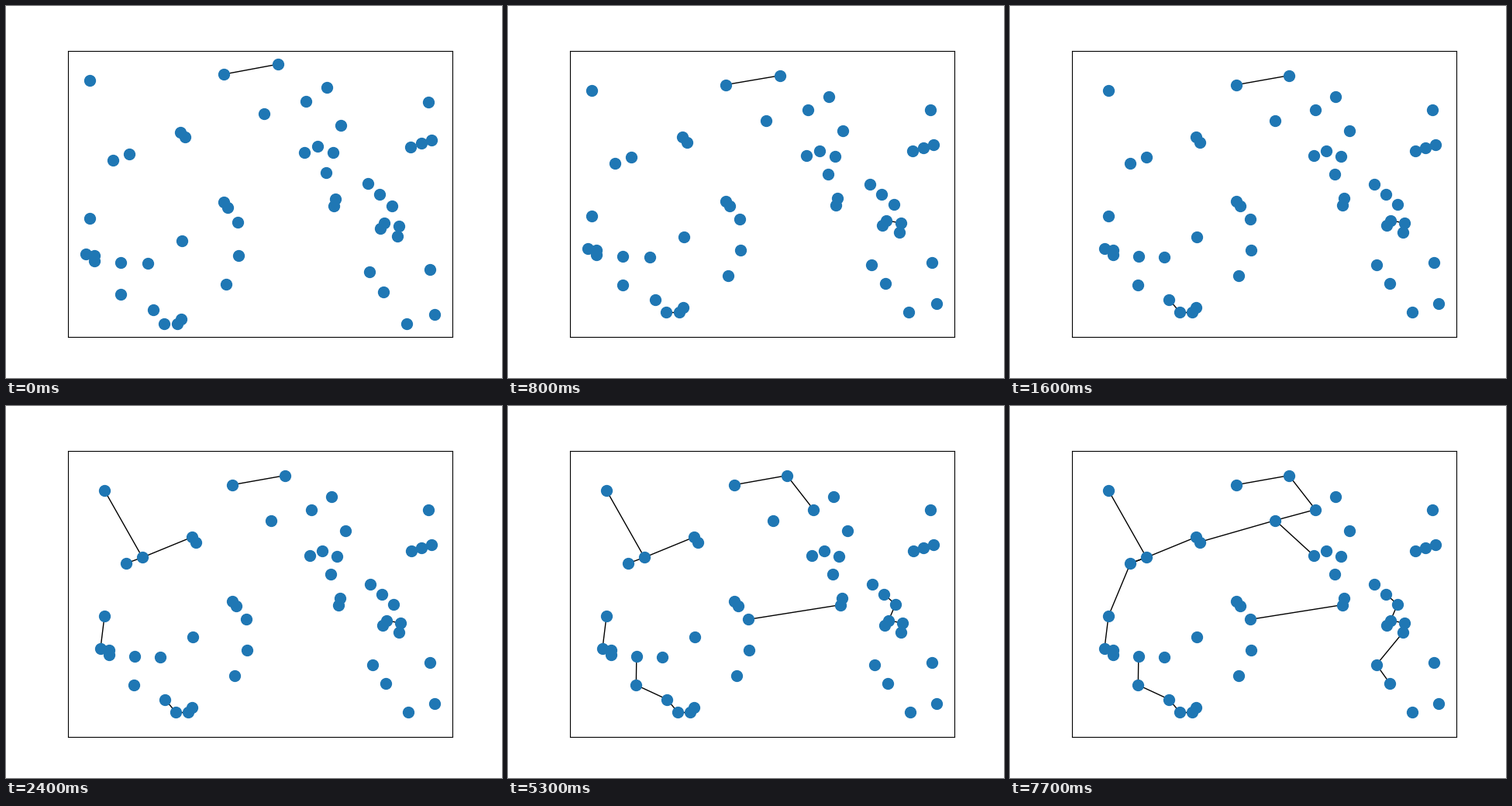
Animation of 640 by 480 pixels, one loop 8 s. Source, as a matplotlib script:

```python
import matplotlib.pyplot as plt
import numpy as np
from matplotlib.animation import FuncAnimation
from matplotlib.collections import LineCollection

FRAMES, INTERVAL = 80, 100
MARGIN = 0.05
VISIT_STEPS = 6      # steps between the visits of two hubs
PAUSE_STEPS = 2      # one longer wait after the third visit

# Key points, y pointing down. A row is three evenly spaced nodes.
ROWS = [
    ((292.2, 101.7), (392.4, 193.4)), ((408, 186.6), (430.6, 248.2)),
    ((470.4, 229.9), (500, 256)), ((523.4, 186.8), (549.3, 178.6)),
    ((132.7, 321.3), (199, 324.1)),
]
# A pair is two touching nodes around a centre, leaning right or left.
PAIRS = [((242, 172.5), 1), ((294.8, 255.2), 1),
         ((488.5, 279.8), -1), ((237.6, 392), -1)]
PAIR_HALF = np.array([2.5, 3.1])
SINGLES = [
    (127.1, 109), (359.9, 89.7), (420, 116.9), (394.1, 133.6), (437.6, 161.3),
    (545.2, 134.3), (427.4, 193.7), (428.8, 256.6), (509, 280.1), (507, 292.2),
    (472.8, 333.8), (547.2, 331.4), (490, 357.8), (553.4, 384.1), (518.8, 395),
    (176, 195.4), (155.4, 202.9), (127.1, 270.9), (121.9, 313), (132.9, 314.8),
    (241, 297.7), (310, 275.4), (310.9, 314.8), (295.4, 348.1), (165.3, 360),
    (205.4, 378.6), (219, 395.1),
]

# Hubs in order of visit, each with the nodes it joins, nearest first
VISITS = [
    (0, [24]), (31, [32, 19]), (49, [22, 48]), (41, [42, 40]), (38, [39, 15, 23]),
    (18, [17]), (47, [13, 48]), (24, [26]), (8, [7, 19]), (30, [5, 44]),
    (1, [26, 2, 16]), (21, [22]), (33, [35, 32]), (39, [38, 40]),
]


def build_nodes():
    rows = [np.linspace(start, end, 3) for start, end in ROWS]
    pairs = [centre + np.outer([-1, 1], PAIR_HALF * (lean, 1))
             for centre, lean in PAIRS]
    return np.vstack(rows + pairs + [SINGLES])


def build_edges():
    """One edge per step during each visit, as (step, hub, node)."""
    edges = []
    for k, (hub, joined) in enumerate(VISITS):
        start = VISIT_STEPS * k - 4 + PAUSE_STEPS * (k > 2)
        edges += [(start + i, hub, node) for i, node in enumerate(joined)]
    return edges


NODES, EDGES = build_nodes(), build_edges()

fig, ax = plt.subplots(figsize=(6.4, 4.8), dpi=100)
ax.set_xticks([])
ax.set_yticks([])
ax.scatter(*NODES.T, s=100, c="#1f77b4", linewidths=1, zorder=2)
lines = LineCollection([], colors="black", linewidths=1, zorder=1)
ax.add_collection(lines, autolim=False)


def view_limits(segments):
    """Fit the nodes and the padded box of the edges, plus a margin."""
    ends = segments.reshape(-1, 2)
    low, high = ends.min(axis=0), ends.max(axis=0)
    pad = MARGIN * (high - low)
    low = np.minimum(NODES.min(axis=0), low - pad)
    high = np.maximum(NODES.max(axis=0), high + pad)
    border = MARGIN * (high - low)
    return low - border, high + border


def draw(frame):
    segments = np.array([NODES[[a, b]] for step, a, b in EDGES if step <= frame])
    lines.set_segments(segments)
    (left, top), (right, bottom) = view_limits(segments)
    ax.set_xlim(left, right)
    ax.set_ylim(bottom, top)
    return [lines]


anim = FuncAnimation(fig, draw, frames=FRAMES, interval=INTERVAL,
                     repeat=True, repeat_delay=0)
plt.show()
```
